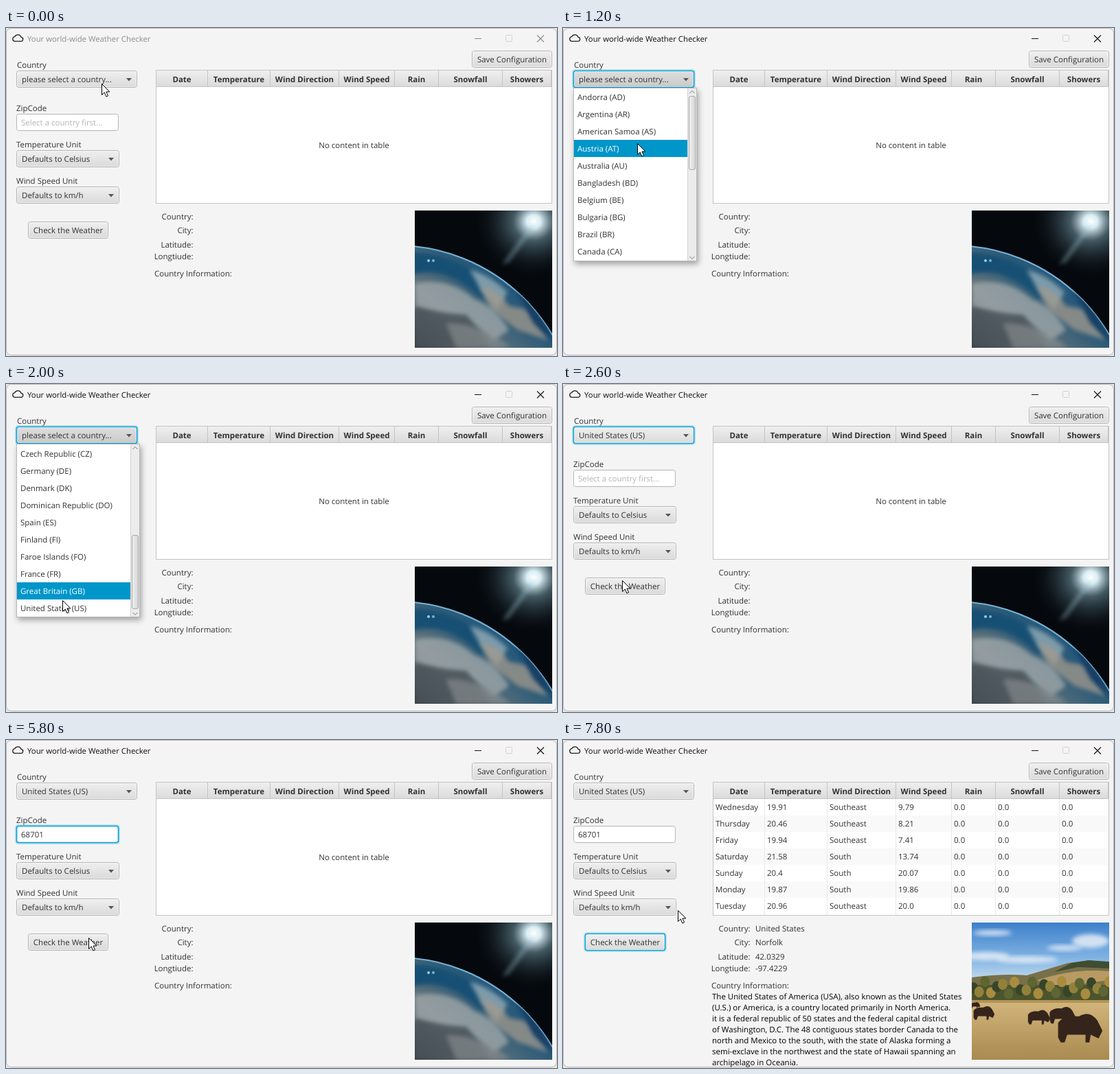
An HTML page for the animation above (8 s loop, 802 by 478 pixels).

```html
<!DOCTYPE html>
<html lang="en">
<head>
<meta charset="utf-8">
<title>Weather Checker</title>
<style>
  html, body { margin: 0; width: 100%; height: 100%; overflow: hidden; background: #e6e6e6; }
  svg { display: block; width: 802px; height: 478px; }
  text { font: 11.5px "Open Sans", "Noto Sans", sans-serif; fill: #323232; text-rendering: geometricPrecision; white-space: pre; }
  .bold { font-weight: 700; }
  .black { fill: #000; }
  .title { font-size: 11.35px; }
</style>
</head>
<body>
<svg viewBox="0 0 802 478">
  <defs>
    <linearGradient id="button" x2="0" y2="1"><stop stop-color="#efefef"/><stop offset="1" stop-color="#dadada"/></linearGradient>
    <linearGradient id="pressed" x2="0" y2="1"><stop stop-color="#dedede"/><stop offset="1" stop-color="#cacaca"/></linearGradient>
    <linearGradient id="thumb" x2="1" y2="0"><stop stop-color="#f0f0f0"/><stop offset="1" stop-color="#d6d6d6"/></linearGradient>
    <linearGradient id="sky" x2="0" y2="1"><stop stop-color="#3d80ca"/><stop offset=".6" stop-color="#7fb2e3"/><stop offset="1" stop-color="#c5dcef"/></linearGradient>
    <linearGradient id="field" x2="0" y2="1"><stop stop-color="#d3b67c"/><stop offset="1" stop-color="#a98a50"/></linearGradient>
    <linearGradient id="globe" gradientUnits="userSpaceOnUse" x1="735" y1="350" x2="620" y2="480">
      <stop stop-color="#1b527c"/><stop offset=".3" stop-color="#315d78"/><stop offset=".65" stop-color="#65747b"/><stop offset="1" stop-color="#343d45"/>
    </linearGradient>
    <radialGradient id="sun"><stop stop-color="#fff"/><stop offset=".12" stop-color="#d9edf4"/><stop offset=".35" stop-color="#58747f" stop-opacity=".75"/><stop offset="1" stop-color="#0a141a" stop-opacity="0"/></radialGradient>
    <clipPath id="photo"><rect x="595" y="266" width="200" height="200"/></clipPath>
    <clipPath id="planet"><circle cx="568" cy="580" r="263"/></clipPath>
    <clipPath id="list"><rect x="16" y="88" width="165" height="251"/></clipPath>
    <clipPath id="window"><rect width="802" height="477"/></clipPath>
    <filter id="shadow" x="-20%" y="-20%" width="140%" height="140%"><feDropShadow dy="4" stdDeviation="4" flood-opacity=".35"/></filter>
    <filter id="soft" x="-30%" y="-30%" width="160%" height="160%"><feGaussianBlur stdDeviation="3"/></filter>
  </defs>
  <g id="scene"></g>
</svg>
<script>
const LOOP = 8000, STEP = 200;
const OPEN = 400, PICKED = 2600, TYPING = 3800, CLICKED = 6200, LOADED = 7400;
const ACCENT = '#039ed3';

const countries = ['Andorra (AD)', 'Argentina (AR)', 'American Samoa (AS)', 'Austria (AT)', 'Australia (AU)',
  'Bangladesh (BD)', 'Belgium (BE)', 'Bulgaria (BG)', 'Brazil (BR)', 'Canada (CA)', 'Switzerland (CH)',
  'Czech Republic (CZ)', 'Germany (DE)', 'Denmark (DK)', 'Dominican Republic (DO)', 'Spain (ES)',
  'Finland (FI)', 'Faroe Islands (FO)', 'France (FR)', 'Great Britain (GB)', 'United States (US)'];
const columns = [['Date', 219], ['Temperature', 294], ['Wind Direction', 385], ['Wind Speed', 485],
  ['Rain', 566], ['Snowfall', 630], ['Showers', 723]];
const forecast = ['Wednesday 19.91 Southeast 9.79', 'Thursday 20.46 Southeast 8.21', 'Friday 19.94 Southeast 7.41',
  'Saturday 21.58 South 13.74', 'Sunday 20.4 South 20.07', 'Monday 19.87 South 19.86', 'Tuesday 20.96 Southeast 20.0'];
const description = ['The United States of America (USA), also known as the United States',
  '(U.S.) or America, is a country located primarily in North America.',
  'it is a federal republic of 50 states and the federal capital district',
  'of Washington, D.C. The 48 contiguous states border Canada to the',
  'north and Mexico to the south, with the state of Alaska forming a',
  'semi-exclave in the northwest and the state of Hawaii spanning an', 'archipelago in Oceania.'];
// time, x, y of the pointer tip
const pointerPath = [[0, 139, 81], [400, 139, 81], [600, 137, 98], [1000, 112, 164], [1200, 108, 168],
  [1400, 186, 130], [1600, 200, 175], [1800, 250, 270], [2000, 82, 315], [2200, 80, 321], [2400, 80, 321],
  [2600, 86, 286], [2800, 89, 260], [3400, 92, 140], [5000, 92, 140], [5800, 120, 288], [6000, 122, 296],
  [6800, 122, 296], [7400, 148, 268], [7800, 167, 248]];

function pointerAt(t) {
  const next = pointerPath.findIndex(p => p[0] > t);
  if (next < 0) return pointerPath.at(-1).slice(1);
  const a = pointerPath[next - 1], b = pointerPath[next], k = (t - a[0]) / (b[0] - a[0]);
  return [a[1] + (b[1] - a[1]) * k, a[2] + (b[2] - a[2]) * k];
}

const text = (x, y, s, extra = '') => `<text x="${x}" y="${y}" ${extra}>${s}</text>`;
const rect = (x, y, w, h, fill, extra = '') => `<rect x="${x}" y="${y}" width="${w}" height="${h}" fill="${fill}" ${extra}/>`;
const path = (d, fill, extra = '') => `<path d="${d}" fill="${fill}" ${extra}/>`;
const line = (d, color, width = 1) => path(d, 'none', `stroke="${color}" stroke-width="${width}"`);
const ellipse = (x, y, rx, ry, fill, extra = '') => `<ellipse cx="${x}" cy="${y}" rx="${rx}" ry="${ry}" fill="${fill}" ${extra}/>`;
const END = 'text-anchor="end"', MIDDLE = 'text-anchor="middle"';

function box(x, y, w, h, fill, focused) {
  const ring = focused
    ? rect(x - .5, y - .5, w + 1, h + 1, 'none', `rx="3.5" stroke="${ACCENT}" stroke-opacity=".25" stroke-width="3"`)
    : '';
  return ring + rect(x + .5, y + .5, w - 1, h - 1, fill, `rx="3" stroke="${focused ? ACCENT : '#b5b5b5'}" stroke-width="${focused ? 1.6 : 1}"`)
    + (fill === '#fff' ? '' : rect(x + 1.5, y + 1.5, w - 3, h - 3, 'none', 'rx="2" stroke="#fff" stroke-opacity=".55"'));
}

function button(x, y, w, label, focused) {
  return box(x, y, w, 25, 'url(#button)', focused) + text(x + w / 2, y + 17, label, MIDDLE);
}

function combo(x, y, w, label, focused, open) {
  return box(x, y, w, 25, `url(#${open ? 'pressed' : 'button'})`, focused) + text(x + 8, y + 17, label)
    + path(`M${x + w - 16} ${y + 11}h8l-4 4.5z`, '#555');
}

function titleBar(active) {
  const ink = active ? '#111' : '#8d8d8d';
  return path('M12.5 19.3h9a3 3 0 0 0 .5-6a5 5 0 0 0-9.300-.6a3.350 3.350 0 0 0-.2 6.600z', 'none', 'stroke="#222" stroke-width="1.3"')
    + text(31, 20, 'Your world-wide Weather Checker', `class="title" style="fill:${ink}"`)
    + line('M682 15.500h10', ink) + rect(727.5, 10.5, 9, 9, 'none', 'rx="1" stroke="#d2d2d2"')
    + line('M773 10.500l10 10m0-10l-10 10', ink, 1.1);
}

function table(loaded) {
  let out = rect(218.5, 61.5, 576, 194, '#fff', 'stroke="#c4c4c4"') + rect(219, 62, 575, 24, 'url(#button)')
    + line('M219 85.500h575', '#c4c4c4');
  columns.forEach(([name, x], i) => {
    const right = i < 6 ? columns[i + 1][1] : 794;
    out += text((x + right - 1) / 2, 79, name, `class="bold" ${MIDDLE}`) + line(`M${right - .5} 62v24`, '#c4c4c4');
  });
  if (!loaded) return out + text(506.5, 175, 'No content in table', MIDDLE);
  forecast.forEach((row, r) => {
    const y = 86 + 24 * r;
    if (r % 2) out += rect(219, y, 575, 24, '#f9f9f9');
    [...row.split(' '), '0.0', '0.0', '0.0'].forEach((cell, c) => out += text(columns[c][1] + 3, y + 16, cell));
  });
  columns.slice(1).forEach(([, x]) => out += line(`M${x - .5} 86v169`, '#e9e9e9'));
  return out;
}

function earthPhoto() {
  const soft = 'filter="url(#soft)"';
  return rect(595, 266, 200, 200, '#05090d')
    + ellipse(768, 282, 85, 80, 'url(#sun)')
    + path('M764 286L722 345L732 341L770 290z', '#9cc5d2', `opacity=".4" ${soft}`)
    + `<circle cx="568" cy="580" r="263" fill="url(#globe)" stroke="#77b5d8" stroke-width="2"/><g clip-path="url(#planet)">`
    + path('M590 326Q665 330 720 385L690 392Q640 345 590 360z', '#174f73', soft)
    + path('M675 352Q705 360 730 385L715 410L690 380z', '#7d9baa', soft)
    + path('M690 376Q718 382 732 405L760 410L790 455L745 440L705 410z', '#a29a8d', `opacity=".75" ${soft}`)
    + path('M595 372Q645 362 682 395Q712 405 732 440L710 456L668 420L595 408z', '#a3aaac', `opacity=".75" ${soft}`)
    + path('M595 405Q635 420 670 418L705 466H595z', '#4d565b', `opacity=".8" ${soft}`)
    + path('M640 430Q690 428 735 466H655z', '#8b8f90', `opacity=".6" ${soft}`)
    + path('M738 372Q775 405 800 460L768 430z', '#123e63', soft) + '</g>'
    + ellipse(615, 339, 2, 2, '#9bd0e4') + ellipse(622, 339, 2, 2, '#75b5cf');
}

const bison = (x, y, k) => `<g transform="translate(${x} ${y}) scale(${k})">`
  + path('M-16 8V-3Q-12-9 0-8Q8-13 14-5L18 3L15 9L9 6L8 12H5V6L-9 6L-11 12H-14z', '#35241b') + '</g>';

function prairiePhoto() {
  const cloud = (x, y, rx, ry) => ellipse(x, y, rx, ry, '#eef3f8', 'opacity=".8" filter="url(#soft)"');
  let out = rect(595, 266, 200, 85, 'url(#sky)') + cloud(625, 281, 28, 4) + cloud(768, 293, 27, 10)
    + cloud(615, 315, 35, 6) + cloud(675, 320, 45, 5) + cloud(730, 303, 25, 4)
    + path('M595 346Q640 340 675 343L735 325L765 321L795 324V385H595z', '#78704a')
    + path('M690 350Q745 332 795 337V350L720 360z', '#b89a62')
    + path('M715 338L740 325L765 321L795 323V333L750 331z', '#3f4d32')
    + rect(595, 357, 200, 24, '#4c542d');
  for (let i = 0; i < 24; i++) {
    out += ellipse(597 + i * 8.6, 361 + 9 * Math.sin(i * 2.4), 7, 8, ['#35452a', '#92813a', '#5d6532', '#a98c3e'][i % 4]);
  }
  return out + rect(595, 380, 200, 86, 'url(#field)') + rect(595, 379, 200, 4, '#b39355')
    + bison(612, 397, .9) + bison(600, 386, .4) + bison(692, 403, .95) + bison(726, 400, 1.1) + bison(751, 418, 1.9);
}

function popup(scroll, hoverRow) {
  const thumbY = 99 + 121 * scroll;
  let out = rect(15.5, 87.5, 179, 252, '#fff', 'stroke="#b8b8b8" filter="url(#shadow)"') + '<g clip-path="url(#list)">';
  countries.forEach((name, i) => {
    const y = 88 + 25 * i - 274 * scroll, hovered = i === hoverRow;
    if (hovered) out += rect(16, y, 165, 25, '#0096c9');
    out += text(21, y + 17, name, hovered ? 'style="fill:#fff"' : '');
  });
  return out + '</g>' + rect(181, 88, 13, 251, '#ececec') + line('M181.500 88v251', '#d2d2d2')
    + rect(183.5, thumbY + .5, 9, 107, 'url(#thumb)', 'rx="2.5" stroke="#a9a9a9"')
    + line('M184.500 95l3.500-3.500l3.500 3.500M184.500 333l3.500 3.500l3.500-3.500', '#777');
}

function pointer(x, y, beam) {
  return beam
    ? line(`M${x - 3} ${y - 7.5}h2.500l1 1l1-1h2.500M${x + .5} ${y - 7}v14M${x - 3} ${y + 7.5}h2.500l1-1l1 1h2.500`, '#000')
    : path(`M${x + .5} ${y + .5}v16l3.700-3.500l2.700 6l2.700-1.200l-2.700-5.800h5z`, '#fff', 'stroke="#000" stroke-linejoin="round"');
}

function render(t) {
  const [x, y] = pointerAt(t);
  const open = t >= OPEN && t < PICKED, picked = t >= PICKED, loaded = t >= LOADED;
  const zipFocused = t >= TYPING && t < CLICKED;
  const zip = '68701'.slice(0, Math.max(0, (t - TYPING) / STEP));
  const caret = zipFocused && (t < 5000 || Math.floor(t / 500) % 2 === 0);

  let out = rect(.5, .5, 801, 476, '#f4f4f4', 'rx="7" stroke="#b9b9b9"') + titleBar(t >= OPEN)
    + text(16, 58, 'Country')
    + combo(15, 62, 176, picked ? 'United States (US)' : 'please select a country...', t >= OPEN && t < TYPING, open)
    + text(15, 121, 'ZipCode') + box(15, 125, 149, 25, '#fff', zipFocused)
    + (t < TYPING ? text(22, 142, 'Select a country first...', 'style="fill:#b4b4b4"') : text(22, 142, zip))
    + (caret ? line(`M${22.3 + zip.length * 6.57} 131v14`, '#222') : '')
    + text(15, 174, 'Temperature Unit') + combo(15, 178, 150, 'Defaults to Celsius')
    + text(15, 227, 'Wind Speed Unit') + combo(15, 231, 150, 'Defaults to km/h')
    + button(32, 282, 117, 'Check the Weather', t >= CLICKED)
    + button(678, 33, 117, 'Save Configuration') + table(loaded);

  [['Country', 'United States', 279], ['City', 'Norfolk', 299], ['Latitude', '42.0329', 320], ['Longtiude', '-97.4229', 337]]
    .forEach(([label, value, base]) => out += text(272.5, base, label + ':', END) + (loaded ? text(280, base, value) : ''));
  out += text(216, 362, 'Country Information:');
  if (loaded) {
    out += '<g clip-path="url(#window)">' + description.map((s, i) => text(217, 378 + 16 * i, s, 'class="black"')).join('') + '</g>';
  }
  out += `<g clip-path="url(#photo)">${loaded ? prairiePhoto() : earthPhoto()}</g>`;

  if (open) {
    const scroll = Math.min(1, Math.max(0, (t - 1400) / 400));
    const overList = x > 16 && x < 181 && y > 92;
    out += popup(scroll, overList ? Math.floor((y - 4 - 88 + 274 * scroll) / 25) : -1);
  }
  const overZip = !open && x > 15 && x < 164 && y > 125 && y < 150;
  return out + pointer(x, y, overZip);
}

const scene = document.getElementById('scene');
let shown = -1;
function tick() {
  const t = Math.floor(performance.now() % LOOP / STEP) * STEP;
  if (t !== shown) scene.innerHTML = render(shown = t);
  requestAnimationFrame(tick);
}
tick();
</script>
</body>
</html>
```
